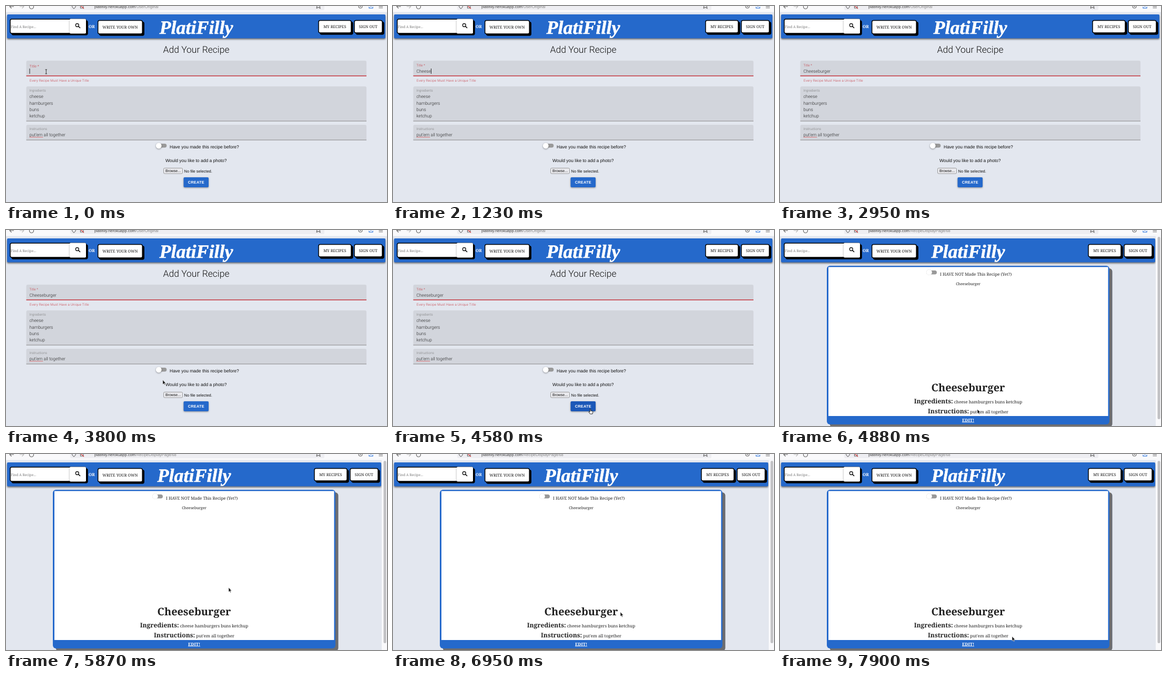
An HTML page for the animation above (8000 ms loop, 724 px wide and 373 px high).

```html
<!DOCTYPE html>
<html lang="en">
<head>
<meta charset="utf-8">
<title>Recipe form</title>
<style>
html, body { margin: 0; width: 100%; height: 100%; overflow: hidden; background: #e3e7ef; }
svg { display: block; width: 724px; height: 373px; text-rendering: geometricPrecision; }
text { white-space: pre; }
.serif { font-family: "Noto Serif", serif; font-size: 8.1px; font-weight: 500; fill: #222; }
.nav { font-size: 7.4px; fill: #111; }
.mid { text-anchor: middle; }
.bold { font-weight: 600; font-size: 12px; }
.form { font: 300 8.45px Roboto, sans-serif; fill: #222; }
.label { font-size: 6.3px; fill: #777; letter-spacing: .05px; }
.red { fill: #c4343c; }
.sans { font: 8.5px "Liberation Sans", sans-serif; fill: #111; }
.url { font-size: 7.5px; fill: #444; }
.icon { fill: none; stroke: #666; stroke-width: 1.1; }
.btn { fill: #fff; stroke: #000; stroke-width: 1.5; filter: drop-shadow(3px 3px 0 #000); }
.soft { filter: drop-shadow(0 1px 1.5px #0006); }
.field { fill: #d2d5dc; }
.blue { fill: #2569cb; }
.logo { font: italic 700 36px "Liberation Serif", serif; fill: #fff; stroke: #fff; stroke-width: .6; }
</style>
</head>
<body>
<svg viewBox="0 0 724 373">
  <defs>
    <rect id="track" x="-4" y="-4" width="19" height="7.6" rx="3.8" fill="#999"/>
  </defs>
  <rect width="724" height="373" fill="#e3e7ef"/>

  <!-- browser bar -->
  <rect width="724" height="11.5" fill="#f9f9fb"/>
  <rect x="122" y="-10" width="483" height="18" rx="3" fill="#eeeef2"/>
  <g class="icon" transform="translate(0 -.5)">
    <path d="M15 1.5H7M10.5 5L7 1.5L10.5 -2"/>
    <path d="M26 1.5H34M30.5 5L34 1.5L30.5 -2" stroke="#bbb"/>
    <path d="M45 0A4 4 0 1 0 52 0"/>
    <path d="M125.5 -3V1Q126 4 129 5.5Q132 4 132.5 1V-3"/>
    <path d="M141.5 -1H147V4.5H141.5Z"/>
    <path d="M140 -2L148 5.5" stroke="#d33"/>
    <path d="M590 5L593.5 3L597 5L596 1L598 -1M590 5L591 1L589 -1"/>
    <path d="M670 -2V1A3.5 3.5 0 0 0 677 1V-2M672 0L673.5 1.5L675 0"/>
    <path d="M690 2V4.5H697V2M693.5 -2V2" stroke="#1668dc"/>
    <path d="M708.5 1H716M708.5 4H716"/>
  </g>
  <text class="sans url" x="168" y="4">platifilly.herokuapp.com<tspan id="path" fill="#888"></tspan></text>

  <!-- page header -->
  <rect id="head" class="blue" x="2" y="16" width="719" height="45.5" rx="2" style="filter:drop-shadow(0 2px 1.5px #0008)"/>
  <rect class="btn" x="8" y="25" width="144" height="27" rx="3"/>
  <rect class="soft" x="121" y="24.5" width="31" height="28" rx="2" fill="#fff"/>
  <path d="M137.5 38.5L141 42" stroke="#111" stroke-width="1.7"/>
  <circle cx="135.3" cy="36.5" r="3" fill="none" stroke="#111" stroke-width="1.3"/>
  <text class="serif" x="9" y="42" style="font-size:6.6px;fill:#777">Find A Recipe...</text>
  <text class="serif mid" x="163" y="42.3" style="font-size:7.9px;fill:#fff;font-weight:600">OR</text>
  <rect class="btn" x="174.7" y="27.5" width="84.5" height="25.5" rx="3"/>
  <text class="serif nav mid" x="216.8" y="43">WRITE YOUR OWN</text>
  <g id="right">
    <rect class="btn" x="594" y="27.5" width="62" height="23.5" rx="3"/>
    <text class="serif nav mid" x="624.8" y="42">MY RECIPES</text>
    <rect class="btn" x="662" y="27.5" width="53" height="23.5" rx="3"/>
    <text class="serif nav mid" x="688.3" y="42">SIGN OUT</text>
  </g>

  <g id="form" class="form">
    <text class="mid" x="361.5" y="88.7" style="font-size:17.5px;fill:#111">Add Your Recipe</text>
    <path class="field" d="M38.5 133V107Q38.5 104 41.5 104H682Q685 104 685 107V133Z"/>
    <path d="M38.5 133H685" stroke="#c4343c" stroke-width="1.3"/>
    <text id="label" class="label red" x="44.5" y="115">Title *</text>
    <text id="title" x="44.5" y="127"></text>
    <path id="caret" stroke="#111" stroke-width=".9"/>
    <text class="label red" x="45" y="143.5" style="letter-spacing:.2px">Every Recipe Must Have a Unique Title</text>
    <path class="field" d="M38.5 219V156Q38.5 153 41.5 153H682Q685 153 685 156V219Z"/>
    <path d="M38.5 219H685" stroke="#888"/>
    <text class="label" x="44.5" y="163.2">Ingredients</text>
    <text y="175.2"><tspan x="44.5">cheese</tspan><tspan x="44.5" dy="12.3">hamburgers</tspan><tspan x="44.5" dy="12.3">buns</tspan><tspan x="44.5" dy="12.3">ketchup</tspan></text>
    <path class="field" d="M38.5 255V229Q38.5 226 41.5 226H682Q685 226 685 229V255Z"/>
    <path d="M38.5 255H685" stroke="#888"/>
    <text class="label" x="44.5" y="236.3">Instructions</text>
    <text x="44.5" y="248.2">put'em all together</text>
    <path d="M45 249.7H70" stroke="#d22" stroke-dasharray="1.2 1"/>
    <use href="#track" x="290.3" y="266"/>
    <circle class="soft" cx="290.3" cy="266" r="5.4" fill="#fff"/>
    <text class="sans" x="311" y="271">Have you made this recipe before?</text>
    <text class="sans" x="303" y="297.2">Would you like to add a photo?</text>
    <rect x="299.5" y="308.5" width="36" height="10.5" rx="2" fill="#e9e9ed" stroke="#888" stroke-width=".8"/>
    <text class="sans mid" x="317.5" y="316.3" style="font-size:7px">Browse...</text>
    <text class="sans" x="338.5" y="316.5" style="font-size:7.5px">No file selected.</text>
    <rect id="create" class="soft" x="337.5" y="326" width="47.5" height="19" rx="2"/>
    <text class="sans mid" x="361.3" y="338.2" style="font-size:7.4px;font-weight:700;fill:#fff;letter-spacing:.2px">CREATE</text>
  </g>

  <g id="card" class="serif">
    <rect id="shade" x="98.5" y="73" width="537" rx="6" fill="#6b6c70"/>
    <rect id="frame" class="blue" x="93" y="68" width="537" rx="6"/>
    <rect id="paper" x="96" y="70.5" width="531.5" fill="#fff"/>
    <rect id="blank" x="95.5" y="97.5" width="532" height="186" fill="#fff" stroke="#a5a9b2"/>
    <use href="#track" x="287" y="81"/>
    <circle cx="287.5" cy="80.5" r="5.4" fill="#fff" style="filter:drop-shadow(0 .8px .6px #0005)"/>
    <text x="308" y="87" style="font-size:7.95px">I HAVE NOT Made This Recipe (Yet?)</text>
    <g class="loaded mid">
      <text x="361.5" y="105" style="font-size:7.1px">Cheeseburger</text>
      <text class="bold" x="361.5" y="307.3" style="font-size:19.9px">Cheeseburger</text>
    </g>
    <g id="foot" class="mid">
      <text x="361.5" y="298"><tspan class="bold">Ingredients:</tspan><tspan class="loaded"> cheese hamburgers buns ketchup</tspan></text>
      <text x="361.5" y="317"><tspan class="bold">Instructions:</tspan><tspan class="loaded"> put'em all together</tspan></text>
      <text x="361.5" y="332.5" fill="#fff" text-decoration="underline" style="font-weight:600">EDIT!</text>
    </g>
  </g>

  <text id="logo" class="logo mid" x="361.5" y="52.5">PlatiFilly</text>

  <g id="bar">
    <rect x="714" y="11.5" width="10" height="362" fill="#f9f9fb"/>
    <rect x="717.5" y="13" width="5" height="347" rx="2.5" fill="#c1c1c4"/>
  </g>

  <path id="beam" d="M74.5 121H78M76.3 121V129M74.5 129H78" stroke="#222" fill="none" stroke-width=".9"/>
  <path id="arrow" d="M0 0V8.5L1.9 6.9L3.2 9.8L4.5 9.2L3.2 6.4H5.8Z" fill="#111" stroke="#fff" stroke-width=".6"/>
  <path id="hand" d="M-.8 0Q.4 -.8 .8 .4V3L4 3.8Q5 4.2 4.8 5.5L4 9H-.5L-3 5.5Q-3 4.2 -1.8 4.9L-.8 5.5Z" fill="#fff" stroke="#111" stroke-width=".9"/>
</svg>
<script>
const $ = id => document.getElementById(id);
const LOOP = 8000, WORD = 'Cheeseburger', OPEN = 4730, LOAD = 4880, HOVER = 4150;

const show = (el, on) => { el.style.display = on ? '' : 'none'; };
const set = (id, name, value) => $(id).setAttribute(name, value);
const move = (id, x, y) => set(id, 'transform', `translate(${x} ${y})`);

// pointer moves: start, end, from x, y, to x, y
const moves = [
  [3100, 4150, 76, 125, 375, 341],
  [4950, 5750, 375, 341, 423, 254],
  [6300, 7600, 423, 254, 441, 347]
];

function pointer(t) {
  const [a, b, x0, y0, x1, y1] = moves.filter(m => t >= m[0]).pop() || moves[0];
  const p = Math.min(1, Math.max(0, (t - a) / (b - a)));
  const e = p * p * (3 - 2 * p);
  return [x0 + (x1 - x0) * e, y0 + (y1 - y0) * e];
}

// typed in two bursts with a pause after the sixth letter
function typed(t) {
  const count = start => Math.min(6, Math.max(0, Math.floor((t - start) / 140) + 1));
  return WORD.slice(0, count(260) + count(1530));
}

function drawForm(t) {
  $('title').textContent = typed(t);
  $('label').style.fontSize = t < 120 ? '7px' : '6.3px';
  set('label', 'y', t < 120 ? 117 : 115);
  const x = 45 + $('title').getComputedTextLength();
  set('caret', 'd', `M${x} 119V129`);
  show($('caret'), t < 2650);
  set('create', 'fill', t >= HOVER ? '#1b58b8' : '#2569cb');
}

// the loaded recipe makes the card taller, so a scrollbar narrows the page
function drawCard(loaded) {
  const grow = loaded ? 32 : 0, left = loaded ? -4 : 0;
  for (const id of ['shade', 'frame']) set(id, 'height', 270 + grow);
  set('paper', 'height', 251.5 + grow);
  move('foot', 0, grow);
  move('card', left, 0);
  move('logo', left, 0);
  move('right', 2 * left, 0);
  set('head', 'width', 719 + 2 * left);
  show($('blank'), !loaded);
  show($('bar'), loaded);
  document.querySelectorAll('.loaded').forEach(el => show(el, loaded));
}

function draw(now) {
  const t = now % LOOP, opened = t >= OPEN;
  show($('form'), !opened);
  show($('card'), opened);
  $('path').textContent = opened ? '/RecipeDisplayPage/68' : '/UserOriginal';
  if (!opened) drawForm(t);
  drawCard(t >= LOAD);

  const [x, y] = pointer(t), hover = t >= HOVER && !opened;
  show($('beam'), t < 260);
  show($('arrow'), t >= moves[0][0] && !hover);
  show($('hand'), hover);
  move('arrow', x, y);
  move('hand', x, y);
  requestAnimationFrame(draw);
}
requestAnimationFrame(draw);
</script>
</body>
</html>
```
